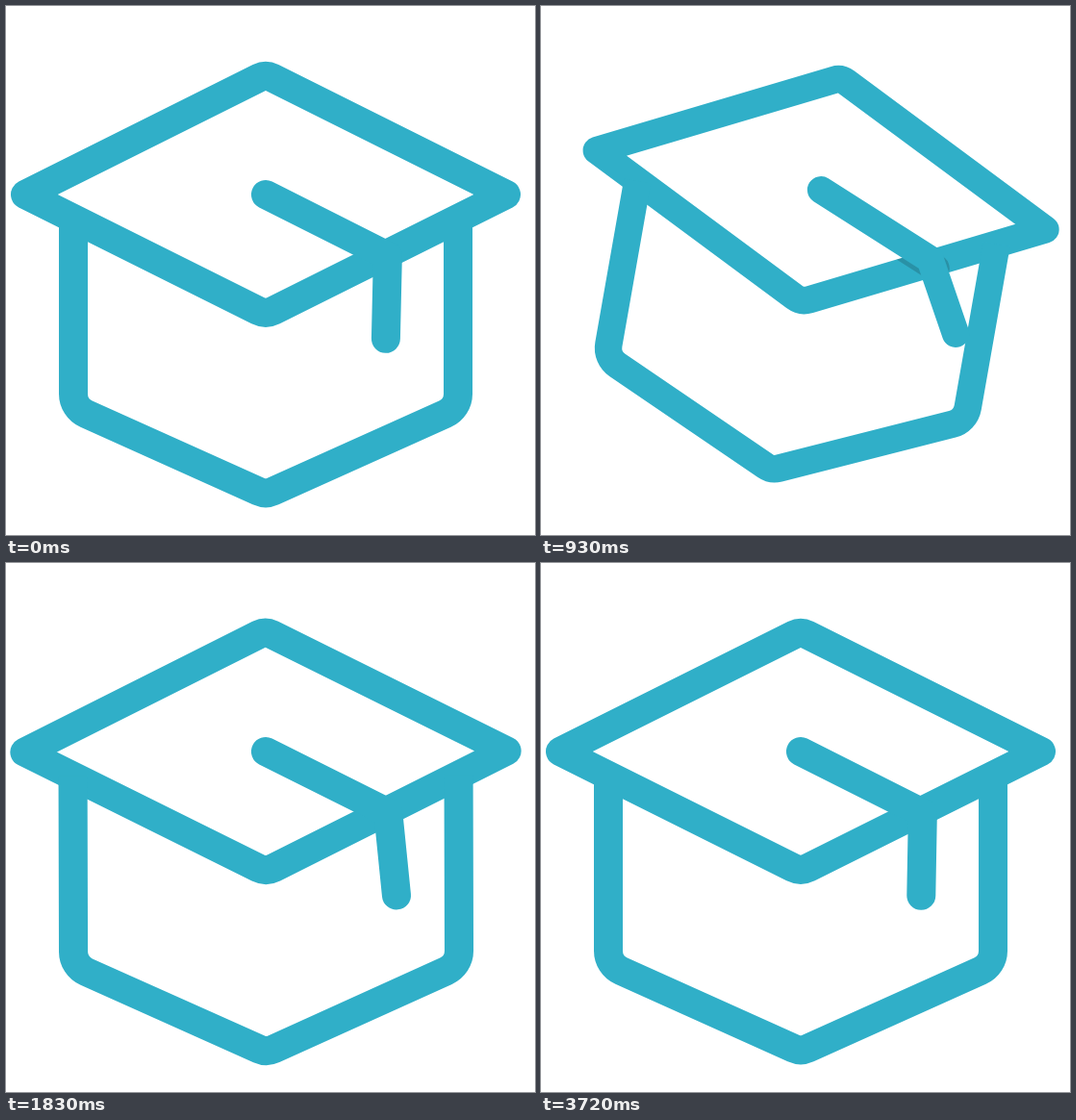
An HTML page with a canvas for the animation above (3.75 s loop, 550 px wide and 550 px high).

```html
<!DOCTYPE html>
<html lang="en">
<head>
<meta charset="utf-8">
<title>Graduation cap</title>
<style>
  html, body { margin: 0; width: 100%; height: 100%; overflow: hidden; background: #fff; }
  canvas { display: block; width: 550px; height: 550px; }
</style>
</head>
<body>
<canvas id="stage" width="550" height="550"></canvas>
<script>
const ctx = document.getElementById('stage').getContext('2d');
const LOOP = 3750, STEP = 30, RAD = Math.PI / 180;
const TEAL = '#30afc8', SHADE = '#2991a6';

// Monotone cubic track through [time, value] keys, at rest at both ends
function track(...keys) {
  const slope = keys.slice(1).map((k, i) => (k[1] - keys[i][1]) / (k[0] - keys[i][0]));
  const tangent = keys.map((_, i) => {
    const a = slope[i - 1] || 0, b = slope[i] || 0;
    return a * b > 0 ? 2 * a * b / (a + b) : 0;
  });
  return t => {
    const last = keys.length - 1;
    if (t >= keys[last][0]) return keys[last][1];
    let i = 0;
    while (t >= keys[i + 1][0]) i++;
    const h = keys[i + 1][0] - keys[i][0], u = (t - keys[i][0]) / h, v = 1 - u;
    return keys[i][1] * (1 + 2 * u) * v * v + keys[i + 1][1] * u * u * (3 - 2 * u)
      + h * u * v * (tangent[i] * v - tangent[i + 1] * u);
  };
}

const capX = track([0, 270], [240, 296.5], [480, 297.5], [750, 296], [1080, 286.5], [1220, 284.5], [1470, 271.5], [1650, 270]);
const capY = track([0, 196], [240, 145], [480, 133], [750, 138], [1080, 229.5], [1220, 220], [1470, 196]);
const tilt = track([0, 0], [240, 16], [480, 25], [750, 19.2], [1080, -1.2], [1220, -17], [1470, 0.46], [1650, -0.2], [2160, 0]);
const size = track([0, 1], [240, 0.98], [480, 0.955], [750, 0.945], [1080, 0.953], [1220, 0.967], [1470, 0.998], [1700, 1.003], [2160, 1]);
const cord = track([0, 0], [240, -7], [480, -10.5], [750, -10], [1080, 0]);
const toss = track([0, 0], [240, -66], [480, -80], [750, -77.5], [1080, 12], [1220, 20], [1470, 12]);

// The loose end keeps swinging after the cap has landed
function swing(t) {
  if (t < 1470) return toss(t);
  const d = t - 1470;
  return 12 * Math.exp(-d / 685) * Math.cos(2 * Math.PI * d / 672);
}

const board = new Path2D();
board.moveTo(-250, 0);
board.arcTo(0, -124.8, 250, 0, 15);
board.lineTo(250, 0);
board.arcTo(0, 124.8, -250, 0, 18);
board.closePath();

const body = new Path2D();
body.moveTo(-200, 25);
body.arcTo(-200, 222, 0, 312, 23);
body.arcTo(0, 312, 200, 222, 18);
body.arcTo(200, 222, 200, 25, 23);
body.lineTo(200, 25);

const polar = (r, deg) => [r * Math.cos(deg * RAD), r * Math.sin(deg * RAD)];

function shadow(angle, lift) {
  const [ox, oy] = polar(1.15 * lift, angle + 90);
  const [x, y] = polar(142 + 2.5 * lift, angle);
  ctx.globalCompositeOperation = 'source-atop';
  ctx.strokeStyle = SHADE;
  ctx.beginPath();
  ctx.moveTo(ox, oy);
  ctx.lineTo(x + ox, y + oy);
  ctx.stroke();
  ctx.globalCompositeOperation = 'source-over';
  ctx.strokeStyle = TEAL;
}

function tassel(angle, endAngle) {
  const [x, y] = polar(142, angle), [dx, dy] = polar(86, endAngle);
  ctx.beginPath();
  ctx.moveTo(0, 0);
  ctx.lineTo(x, y);
  ctx.lineTo(x + dx, y + dy);
  ctx.stroke();
}

function draw(t) {
  ctx.setTransform(1, 0, 0, 1, 0, 0);
  ctx.clearRect(0, 0, 550, 550);
  ctx.translate(capX(t), capY(t));
  ctx.rotate(tilt(t) * RAD);
  ctx.scale(size(t), size(t));
  ctx.lineWidth = 30;
  ctx.lineJoin = 'round';
  ctx.lineCap = 'round';
  ctx.strokeStyle = TEAL;

  const angle = 26.7 + cord(t), lift = -cord(t);
  ctx.stroke(board);
  if (lift > 0.1) shadow(angle, lift);
  ctx.lineCap = 'butt';
  ctx.stroke(body);
  ctx.lineCap = 'round';
  tassel(angle, 91.3 + swing(t));
}

const start = performance.now();
function tick() {
  const t = (performance.now() - start) % LOOP;
  draw(Math.floor(t / STEP) * STEP);
  requestAnimationFrame(tick);
}
tick();
</script>
</body>
</html>
```
